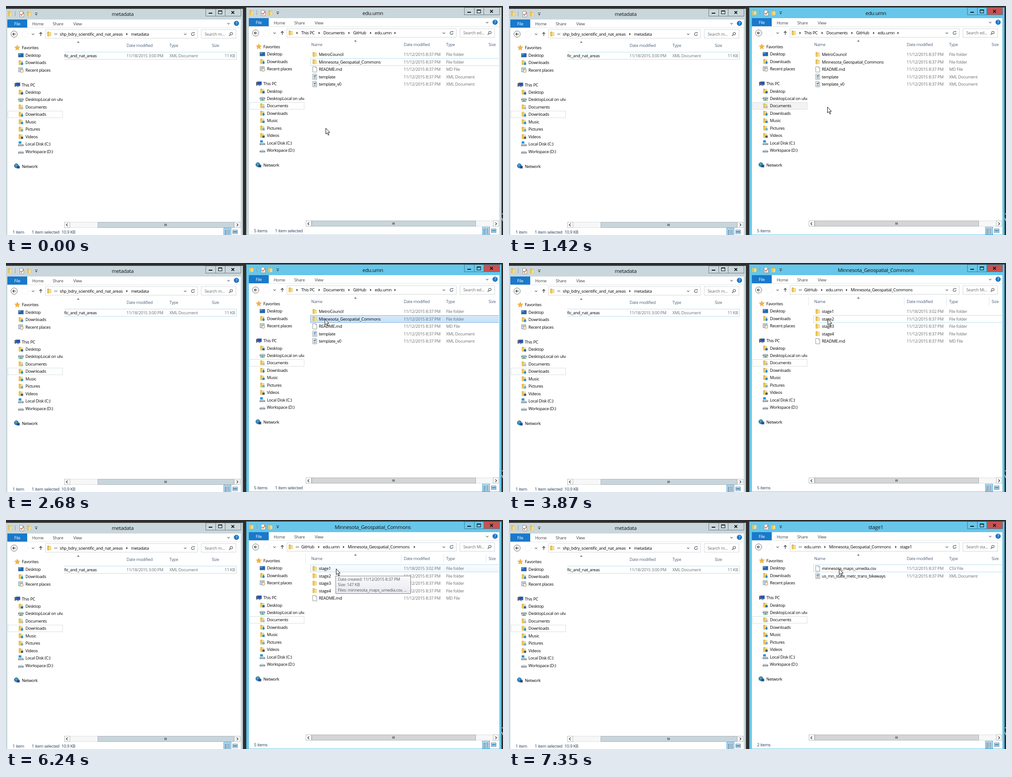
An HTML page with a canvas that plays this animation: 1101 by 509 pixels, repeating every 8000 ms.

```html
<!DOCTYPE html>
<html lang="en">
<head>
<meta charset="utf-8">
<title>File windows</title>
<style>
html, body { margin: 0; width: 100%; height: 100%; overflow: hidden; background: #2e2e2e; }
canvas { display: block; }
</style>
</head>
<body>
<canvas id="stage" width="1101" height="509"></canvas>
<script>
const LOOP = 8000;
const c = document.getElementById('stage').getContext('2d');
let ox = 0, oy = 0;   // origin of the window being drawn

// ---------- drawing helpers ----------
const snap = v => Math.ceil(v - .5);

function box(x, y, w, h, fill, line) {
  x = snap(x + ox);
  y = snap(y + oy);
  if (fill) { c.fillStyle = fill; c.fillRect(x, y, w, h); }
  if (line) { c.strokeStyle = line; c.lineWidth = 1; c.strokeRect(x + .5, y + .5, w - 1, h - 1); }
}

function text(s, x, y, color = '#000', size = 9.25, align = 'left') {
  const weight = size > 10 ? 400 : 500;
  c.font = `${weight} ${size}px "Open Sans", "Noto Sans", sans-serif`;
  c.letterSpacing = size * -.028 + 'px';
  c.textAlign = align;
  c.fillStyle = color;
  c.fillText(s, x + ox, y + oy + size * .36);
}

function poly(pts, fill, line, width = 1) {
  c.beginPath();
  for (let i = 0; i < pts.length; i += 2) c.lineTo(pts[i], pts[i + 1]);
  if (fill) { c.closePath(); c.fillStyle = fill; c.fill(); }
  if (line) { c.strokeStyle = line; c.lineWidth = width; c.stroke(); }
}

function disc(x, y, r, fill, line, width = 1) {
  c.beginPath();
  c.arc(x, y, r, 0, 7);
  if (fill) { c.fillStyle = fill; c.fill(); }
  if (line) { c.strokeStyle = line; c.lineWidth = width; c.stroke(); }
}

function fill(x, y, w, h, color) { c.fillStyle = color; c.fillRect(x, y, w, h); }

function clip(x, y, w, h, draw) {
  c.save();
  c.beginPath();
  c.rect(x + ox, y + oy, w, h);
  c.clip();
  draw();
  c.restore();
}

// ---------- icons, drawn around their centre ----------
function folder() {
  poly([-5, -5, -1, -5.5, 0, -4, 4, -4, 4.5, 4, -4, 5], '#cfa23f');
  poly([-1, -4, 4, -3, 4, 4, -1, 5.5], '#f6dd8c');
  poly([-5, -5, -1.5, -3.5, -1.5, 5.5, -5, 4.5], '#ebc75c');
}
function page() {
  poly([-4.5, -6, 2, -6, 4.5, -3.5, 4.5, 6, -4.5, 6, -4.5, -6], '#fff', '#7f8990', .9);
  poly([2, -6, 2, -3.5, 4.5, -3.5], null, '#7f8990', .8);
}
function screen(w, h, color) {
  fill(-w / 2, -h / 2, w, h, '#5d7388');
  fill(-w / 2 + 1, -h / 2 + 1, w - 2, h - 2, color);
}
function withBadge(color) {
  return () => { folder(); fill(0, 0, 5, 5, color); };
}
function drive() {
  poly([-6, 1, -4, -2, 4, -2, 6, 1], '#e4e8eb');
  fill(-6, 1, 12, 3.5, '#67717a');
  fill(-5, 2, 10, 1.5, '#c9d0d5');
}

const icons = {
  folder, page,
  xml() { page(); fill(-2.5, -3, 5, 2.5, '#44779f'); fill(-2.5, 1, 5, 1, '#5b7384'); fill(-2.5, 3, 5, 1, '#5b7384'); },
  star() {
    const pts = [];
    for (let i = 0; i < 10; i++) {
      const r = i % 2 ? 2.6 : 6, a = i * Math.PI / 5;
      pts.push(r * Math.sin(a), -r * Math.cos(a));
    }
    poly(pts, '#f8b733', '#d98c1f', .7);
  },
  desktop() { screen(12, 9, '#1f66b5'); fill(-5, -3.5, 5, 3, '#4d94d9'); },
  down() {
    folder();
    poly([1, -1, 4, -1, 4, 2, 6, 2, 2.5, 6, -1, 2, 1, 2], '#1d87d6');
  },
  recent() {
    fill(-5, -5, 9, 9, '#dfe7ed');
    c.strokeStyle = '#71869a'; c.lineWidth = 1; c.strokeRect(-5, -5, 9, 9);
    fill(-3, -3, 5, 1, '#7e96aa'); fill(-3, -1, 3, 1, '#7e96aa');
    disc(2, 2, 3.4, '#f6f0dc', '#9c8b5e');
  },
  pc() {
    fill(-6, -4, 3, 8, '#596673');
    c.translate(1.5, -1); screen(10, 8, '#2451b5');
    fill(-2, 4, 4, 2, '#8996a1');
  },
  user: withBadge('#2b69a9'),
  net() {
    c.translate(0, -3); drive();
    fill(-1, 4.5, 2, 3, '#23a35a'); fill(-5, 6, 10, 1.5, '#23a35a');
  },
  docs: withBadge('#a9c1d1'),
  music: withBadge('#2c8fd1'),
  pics: withBadge('#6aaed6'),
  video: withBadge('#4c5c69'),
  disk() { drive(); fill(-5, -6, 6, 5, '#2598d8'); },
  drive,
  globe() { c.translate(-1, -1); disc(-1, 0, 4.6, '#2d8ec5', '#1b5f95'); fill(-3, -3, 3, 3, '#63bb6b'); c.translate(3, 3); screen(7, 6, '#1d3fa3'); },
  check() { page(); poly([-3, 0, -1, 3, 4, -3], null, '#d2552c', 1.5); },
  customise() { fill(-3, -3, 6, 1, '#333'); poly([-2.5, 0, 2.5, 0, 0, 2.8], '#333'); },
  menu() { poly([-2.5, -1.2, 0, 1.4, 2.5, -1.2], null, '#56606a', 1.2); },
  sort() { poly([-3, 1.5, 0, -1.5, 3, 1.5], '#596673'); },
  next() { poly([-1.4, -2.7, 1.5, 0, -1.4, 2.7], '#222'); },
  more() {
    poly([-.5, -2, -2.5, 0, -.5, 2], null, '#333');
    poly([3, -2, 1, 0, 3, 2], null, '#333');
  },
  back() { disc(0, 0, 7, '#fff', '#656b70'); poly([0, -3, -3, 0, 0, 3], null, '#444', 1.4); fill(-3, -.7, 6.5, 1.4, '#444'); },
  forward() { c.setLineDash([1, 1.5]); disc(0, 0, 7, null, '#dedede'); },
  up() { poly([-3, -.5, 0, -3.7, 3, -.5], null, '#4b5157', 1.5); fill(-.7, -3, 1.4, 7, '#4b5157'); },
  reload() {
    c.beginPath(); c.arc(0, 0, 3.2, 0, 5.2);
    c.strokeStyle = '#5b646c'; c.lineWidth = 1.2; c.stroke();
    poly([1, -4.5, 4, -4, 3, -1], '#5b646c');
  },
  lens() { disc(1, -1, 2.7, null, '#555', 1.1); poly([-1, 1, -4, 4], null, '#555', 1.5); },
  help() { disc(0, 0, 5.3, '#1c78c8', '#0f5da5', .8); },
  close() {
    poly([-3, -3, 3, 3], null, '#111', 1.7);
    poly([-3, 3, 3, -3], null, '#111', 1.7);
  },
  scrollLeft() { poly([1.5, -3, -1.5, 0, 1.5, 3], null, '#333', 1.3); },
  scrollRight() { poly([-1.5, -3, 1.5, 0, -1.5, 3], null, '#333', 1.3); },
  details() {
    fill(-8, -8, 17, 17, '#c5e4f5');
    c.strokeStyle = '#3c9bd0'; c.lineWidth = 1; c.strokeRect(-7.5, -7.5, 16, 16);
    for (let y = -4; y < 6; y += 3) { fill(-5, y, 2, 2, '#37688c'); fill(-2, y, 3, 1, '#3d4c59'); fill(2, y, 4, 1, '#3d4c59'); }
  },
  thumbs() { screen(11, 9, '#eef6fb'); fill(-4, -2, 8, 4, '#4b9bd0'); }
};

function icon(name, x, y) {
  c.save();
  c.translate(x + ox, y + oy);
  icons[name]();
  c.restore();
}

// ---------- content ----------
// icon, label, indent level; null leaves an empty line
const tree = [
  ['star', 'Favorites'], ['desktop', 'Desktop', 1], ['down', 'Downloads', 1], ['recent', 'Recent places', 1], null,
  ['pc', 'This PC'], ['user', 'Desktop', 1], ['net', 'DesktopLocal on ulvault', 1], ['docs', 'Documents', 1],
  ['down', 'Downloads', 1], ['music', 'Music', 1], ['pics', 'Pictures', 1], ['video', 'Videos', 1],
  ['disk', 'Local Disk (C:)', 1], ['drive', 'Workspace (D:)', 1], null, ['globe', 'Network']
];
const kinds = { folder: 'File folder', page: 'MD File', xml: 'XML Document', csv: 'CSV File' };
const noon = '11/12/2015 8:37 PM';
const commons = 'Minnesota_Geospatial_Commons';

const left = {
  title: 'metadata', search: 'Search m...', items: 1, size: '10.9 KB',
  crumbs: [['shp_bdry_scientific_and_nat_areas', 119], ['metadata', 277]],
  cols: [0, 267, 362, 456], sort: 160, thumb: [203, 505], marked: 9
};
const base = { cols: [141, 346, 440, 534], sort: 239, thumb: [142, 506], marked: 8, items: 5 };
const views = [
  [0, { ...base, title: 'edu.umn', search: 'Search ed...', root: true, tail: 327,
    crumbs: [['This PC', 119], ['Documents', 168], ['GitHub', 234], ['edu.umn', 282]],
    files: [['folder', 'MetroCouncil'], ['folder', commons], ['page', 'README.md'], ['xml', 'template'], ['xml', 'template_v0']] }],
  [3870, { ...base, title: commons, search: 'Search Mi...', lines: true,
    crumbs: [['GitHub', 119], ['edu.umn', 167], [commons, 222]],
    files: [['folder', 'stage1', '11/18/2015 3:02 PM'], ['folder', 'stage2'], ['folder', 'stage3'], ['folder', 'stage4'], ['page', 'README.md']] }],
  [7350, { ...base, title: 'stage1', search: 'Search sta...', items: 2,
    crumbs: [['edu.umn', 119], [commons, 174], ['stage1', 331]],
    files: [['csv', 'minnesota_maps_umedia.csv'], ['xml', 'us_mn_state_metc_trans_bikeways']] }]
];

// ---------- timeline ----------
const pointer = [
  [0, 708, 271], [740, 708, 269], [1420, 705, 224], [1570, 704, 179], [1710, 704, 152], [1860, 704, 144],
  [1980, 705, 136], [2100, 706, 128], [2220, 706, 124], [5040, 704, 115], [5160, 703, 111],
  [5310, 701, 106], [5590, 721, 108], [5740, 731, 108]
];
const marks = [
  [0, 1, 'focus'], [890, 1, 'select'], [1040, -1, 'focus'], [1710, 3, 'hover'], [1860, 2, 'hover'], [2100, 1, 'hover'],
  [2680, 1, 'select'], [3870, 1, 'focus'], [5040, 0, 'hover'], [7050, 0, 'select'], [7350, 0, 'focus']
];
const tones = {
  focus: ['#fff', '#fff', '#b9dff0'],
  hover: ['#fafdff', '#eef7fd', '#bbdff3'],
  select: ['#d6e9fa', '#c6e0f6', '#86b8e3']
};
const at = (steps, t) => steps.findLast(s => s[0] <= t);
const within = (t, a, b) => t >= a && t < b;

// ---------- windows ----------
const PITCH = 16.45;
const rowY = i => 110.4 + PITCH * i;
const treeY = i => 93 + PITCH * i;

function rowMark(i, x, w, tone) {
  const y = rowY(i) - 8.4, [top, end, edge] = tones[tone];
  const g = c.createLinearGradient(0, y + oy, 0, y + oy + 17);
  g.addColorStop(0, top);
  g.addColorStop(1, end);
  box(x, y, w, 17, g, edge);
}

function frame(v, R, active) {
  const tint = active ? '#67c6e9' : '#c9d7dc';
  box(-3, 6, 528 + R, 520, tint, active ? '#4a97b3' : '#a5b2b7');
  box(3, 30, 517 + R, 481, '#fff');

  icon('folder', 9, 17.5);
  box(20, 12, 1, 11, '#8ba0a8');
  icon('check', 35, 18);
  icon('folder', 51, 18);
  icon('customise', 67, 18);
  text(v.title, 258.5 + R / 2, 18, '#111', 11.4, 'center');

  const edge = active ? '#337d9d' : '#6f7c82';
  box(442 + R, 6, 23, 17, null, edge);
  box(464 + R, 6, 22, 17, null, edge);
  box(485 + R, 6, 36, 17, active ? '#c85250' : null, edge);
  box(449 + R, 15.5, 8, 2, '#111');
  box(470 + R, 10.5, 9, 8, null, '#111');
  box(470 + R, 10.5, 9, 2, '#111');
  icon('close', 502.5 + R, 14.4);

  box(3, 30, 44, 18, '#1979ca');
  text('File', 25, 39.5, '#fff', 9.25, 'center');
  [['Home', 58], ['Share', 103.5], ['View', 149]].forEach(([s, x]) => text(s, x, 40, '#444'));
  icon('menu', 493 + R, 39);
  icon('help', 510.5 + R, 38.5);
  text('?', 510.5 + R, 38.5, '#fff', 9, 'center');
  box(3, 48, 517 + R, 1, '#e3e5e6');
}

function address(v, R, tail) {
  icon('back', 18, 62.5);
  icon('forward', 42, 62.5);
  icon('menu', 60, 62.5);
  icon('up', 77, 62.5);
  box(87, 52.5, 338 + R, 20, '#fff', '#d3d6d8');
  box(432 + R, 52.5, 78, 20, '#fff', '#d3d6d8');
  icon('folder', 96, 62.5);
  icon(v.root ? 'next' : 'more', 110, 62.5);
  v.crumbs.forEach(([s, x], i) => {
    text(s, x, 62.5);
    if (i) icon('next', x - 9, 62.5);
  });
  if (tail) icon('next', tail, 62.5);
  icon('menu', 397 + R, 62.5);
  icon('reload', 414 + R, 62.5);
  text(v.search, 440 + R, 62.5, '#6d6d6d');
  icon('lens', 498 + R, 62.5);
}

function sidebar(v, idle) {
  box(4, treeY(v.marked) - 8.3, 122, 16, idle ? '#f3f3f3' : '#fff', '#d8dee2');
  clip(3, 75, 123, 400, () => tree.forEach((row, i) => {
    if (!row) return;
    const [name, label, deep = 0] = row;
    icon(name, 25 + 8 * deep, treeY(i));
    text(label, 35 + 8 * deep, treeY(i));
  }));
}

function header(v) {
  ['Name', 'Date modified', 'Type', 'Size'].forEach((s, i) => {
    if (v.cols[i]) text(s, v.cols[i], 87.8, '#4c607a');
  });
  icon('sort', v.sort, 80);
  if (v.lines) [128, 340, 434, 528].forEach(x => box(x, 79, 1, 18, '#dfe4e8'));
}

function footer(v, R, selected, thumb) {
  const end = 519 + R, [a, b] = v.thumb, mid = Math.round((a + b) / 2);
  box(129, 480, end - 129, 13, '#f7f7f7', '#dcdfe1');
  box(a, 480, b - a, 13, thumb, '#a9b3b8');
  box(129, 480, 13, 13, '#fff', '#b3babd');
  box(end - 13, 480, 13, 13, '#fff', '#b3babd');
  for (let x = -3; x <= 2; x += 2) box(mid + x, 484, 1, 5, '#444');
  icon('scrollLeft', 135, 486.5);
  icon('scrollRight', end - 6.5, 486.5);
  text(v.items + (v.items > 1 ? ' items' : ' item'), 14.5, 502.3, '#1e395b');
  if (selected) text('1 item selected', v.items > 1 ? 61 : 57, 502.3, '#1e395b');
  if (v.size) text(v.size, 123, 502.3, '#1e395b');
  icon('details', 490 + R, 501.5);
  icon('thumbs', 507.5 + R, 502);
}

function leftWindow() {
  ox = oy = 0;
  frame(left, 0, false);
  address(left, 0);
  sidebar(left);
  header(left);
  clip(129, 75, 391, 400, () => {
    rowMark(0, 120, 391, 'focus');
    text('shp_bdry_scientific_and_nat_areas', 201, 110.5, '#000', 9.25, 'right');
  });
  text('11/18/2015 3:00 PM', 267, 110.5, '#6d6d6d');
  text('XML Document', 362, 110.5, '#6d6d6d');
  text('11 KB', 507.5, 110.5, '#6d6d6d', 9.25, 'right');
  footer(left, 0, true, '#c8d6db');
}

function rightWindow(t) {
  const v = at(views, t)[1], [, row, tone] = at(marks, t), R = 38, active = t >= 890;
  const selected = t < 1040 || within(t, 2680, 3870) || within(t, 7200, 7350);
  ox = 535;
  oy = -2.5;
  frame(v, R, active);
  address(v, R, within(t, 4140, 7350) ? 370 : v.tail);
  sidebar(v, within(t, 1040, 2680));
  clip(128, 75, 429, 400, () => {
    header(v);
    if (row >= 0) rowMark(row, 139, 430, tone);
    v.files.forEach(([kind, name, date = noon], i) => {
      const y = rowY(i);
      icon(kind === 'csv' ? 'page' : kind, 149, y);
      text(name, 158, y);
      text(date, v.cols[1], y, '#6d6d6d');
      text(kinds[kind], v.cols[2], y, '#6d6d6d');
    });
  });
  footer(v, R, selected, active ? '#d5d5d5' : '#c8d6db');
}

function tooltip() {
  const g = c.createLinearGradient(0, 124, 0, 164);
  g.addColorStop(0, '#fafafc');
  g.addColorStop(1, '#e8e9f1');
  box(730, 124, 167, 40, g, '#808080');
  ['Date created: ' + noon, 'Size: 147 KB', 'Files: minnesota_maps_umedia.csv, ...']
    .forEach((s, i) => text(s, 735, 132 + 12 * i, '#575757'));
}

function cursor(x, y) {
  c.save();
  c.translate(x + .5, y + .5);
  poly([0, 0, 0, 13, 3, 10.3, 5.2, 15.6, 7.2, 14.7, 5, 9.7, 8.8, 9.7, 0, 0], '#fff', '#111');
  c.restore();
}

function draw(t) {
  ox = oy = 0;
  fill(0, 0, 1101, 509, '#2e2e2e');
  poly([1101, 462, 1098.5, 462], null, '#ddd', 1.5);
  poly([1098, 471, 1101, 478], null, '#ddd', 1.5);
  leftWindow();
  rightWindow(t);
  ox = oy = 0;
  if (within(t, 6240, 7050)) tooltip();
  const [, x, y] = at(pointer, t);
  cursor(x, y);
}

const start = performance.now();
function tick() {
  draw((performance.now() - start) % LOOP);
  requestAnimationFrame(tick);
}
tick();
</script>
</body>
</html>
```
